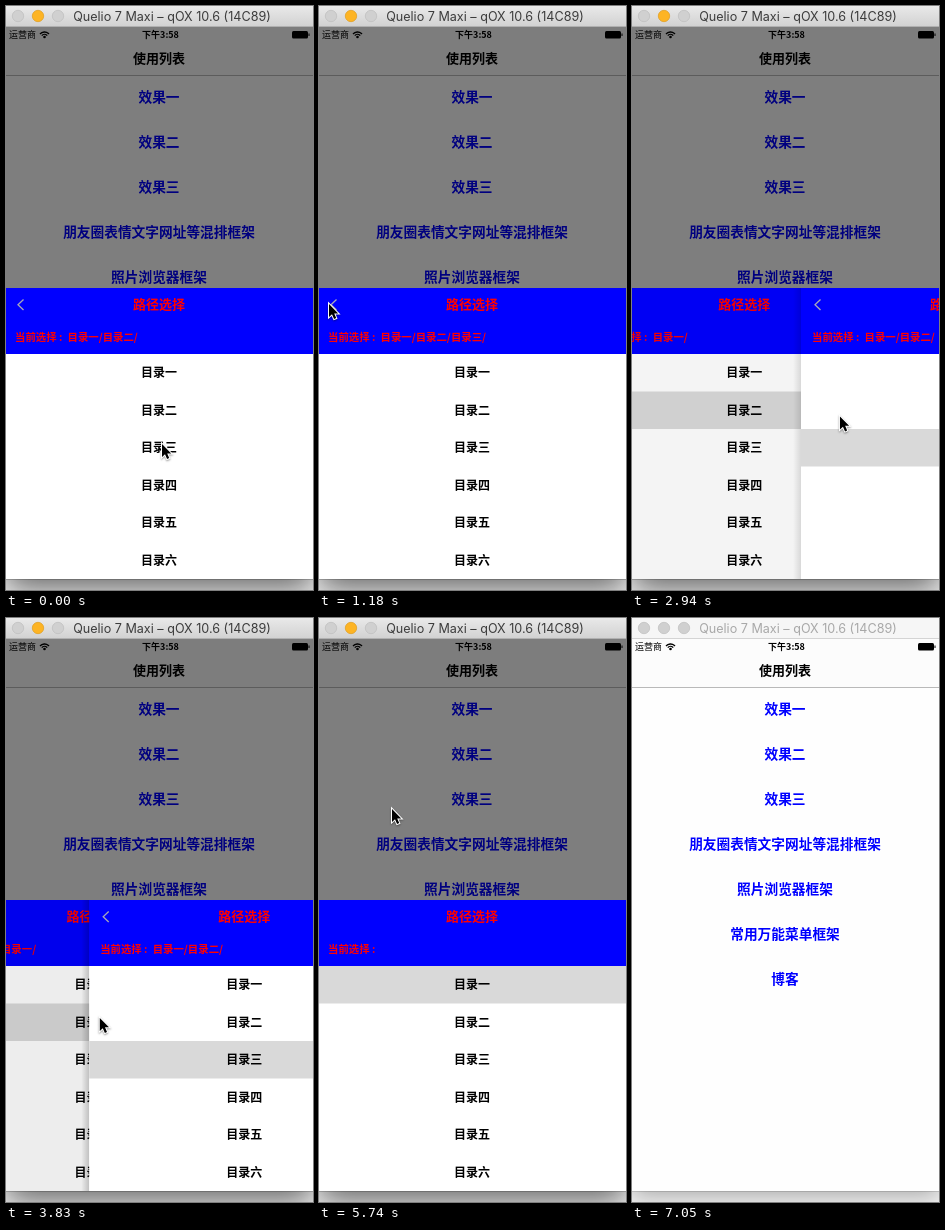
Recreate the animation shown at these times as an HTML page with a canvas. Size 307 by 584 pixels, loop 7.15 s.

```html
<!DOCTYPE html>
<html lang="zh">
<head>
<meta charset="utf-8">
<title>路径选择</title>
<style>
html, body { margin: 0; width: 100%; height: 100%; overflow: hidden; background: #eee; }
canvas { display: block; width: 307px; height: 584px; }
</style>
</head>
<body>
<canvas id="stage"></canvas>
<script>
const W = 307, H = 584, TOP = 21, BOTTOM = 573, SHEET = 282, ROWS = 348, ROW_H = 37.5;
const LOOP = 7150, STEP = 147.18, INACTIVE_AT = 7050, LAST_STEP = 44;
const BLEED = 2;             // pages reach this far past the left window edge
const LAG = 0.4, GRAB = 8;   // a dragged page trails the pointer
const CJK = '"Noto Sans CJK SC", "Noto Sans CJK", sans-serif';
const LATIN = 'Inter, Roboto, sans-serif';

const canvas = document.getElementById('stage');
const ctx = canvas.getContext('2d');
const dpr = window.devicePixelRatio || 1;
canvas.width = W * dpr;
canvas.height = H * dpr;

const MENU = ['效果一', '效果二', '效果三', '朋友圈表情文字网址等混排框架',
  '照片浏览器框架', '常用万能菜单框架', '博客'];
const DIRS = [...'一二三四五六'].map(d => '目录' + d);

// Turning points of the pointer tip: [step, x, y]
const TURNS = [
  [4, 156, 438], [8, 10, 298], [11, 10, 298], [16.5, 1, 412], [21.6, 271, 410],
  [25.8, 92, 400], [29, 251, 392], [31.6, -1, 309], [36, 241, 300], [39, 73, 191]
];

const clamp = v => Math.max(0, Math.min(1, v));
const mix = (a, b, p) => a + (b - a) * p;
const smooth = p => p * p * (3 - 2 * p);
const easeOut = p => 1 - (1 - p) ** 3;

function pointerAt(n) {
  const i = Math.max(1, TURNS.findIndex(k => k[0] >= n));
  const [a, b] = n > TURNS.at(-1)[0] ? TURNS.slice(-2) : [TURNS[i - 1], TURNS[i]];
  const p = smooth(clamp((n - a[0]) / (b[0] - a[0])));
  return [mix(a[1], b[1], p), mix(a[2], b[2], p)];
}

// Follows the pointer, then glides off to the right after the release
function drag(n, release) {
  const x = Math.max(0, pointerAt(n - LAG)[0] - GRAB);
  return mix(x, W, smooth(clamp((n - release) / 2)));
}

// Which page is on top, and how far it has moved to the right
function topPage(n) {
  if (n < 9) return [3, W * (1 - easeOut(clamp((n - 1.4) / 3)))];
  if (n < 17) return [3, W * easeOut(clamp((n - 9.6) / 3))];
  if (n < 32) return [2, drag(n, 27.5)];
  return [1, drag(n, 35)];
}

function rect(color, x, y, w, h) {
  ctx.fillStyle = color;
  ctx.fillRect(x, y, w, h);
}

function gradient(x0, y0, x1, y1, from, to) {
  const g = ctx.createLinearGradient(x0, y0, x1, y1);
  g.addColorStop(0, from);
  g.addColorStop(1, to);
  return g;
}

// y is the visual middle of the glyphs
function label(str, x, y, size, color, align = 'center', weight = 600, family = CJK) {
  ctx.font = `${weight} ${size}px ${family}`;
  ctx.fillStyle = color;
  ctx.textAlign = align;
  ctx.fillText(str, x, y + size * 0.37);
}

function drawBackdrop(active) {
  rect('#f2f2f2', 0, 0, W, H);
  ctx.save();
  ctx.shadowColor = active ? 'rgba(0,0,0,.58)' : 'rgba(0,0,0,.3)';
  ctx.shadowBlur = (active ? 30 : 22) * dpr;
  ctx.shadowOffsetY = (active ? 10 : 5) * dpr;
  rect('#fff', 0, 0, W, BOTTOM);
  ctx.restore();
  rect(active ? 'rgba(0,0,0,.2)' : 'rgba(0,0,0,.14)', 0, BOTTOM, W, 1);
}

function drawStatusBar() {
  label('运营商', 3, 29, 9, '#000', 'left', 400);
  ctx.strokeStyle = '#000';
  ctx.lineWidth = 1.3;
  for (const r of [3.6, 6]) {
    ctx.beginPath();
    ctx.arc(38.5, 32, r, -Math.PI * 0.77, -Math.PI * 0.23);
    ctx.stroke();
  }
  ctx.beginPath();
  ctx.arc(38.5, 31, 1.3, 0, 7);
  ctx.fill();
  label('下午3:58', 154.5, 29, 9, '#000');
  ctx.beginPath();
  ctx.roundRect(286, 25, 16, 7.5, 1.5);
  ctx.fill();
  rect('#000', 302.5, 27.5, 1, 2.5);
}

function drawMenu() {
  rect('#fefefe', 0, TOP, W, BOTTOM - TOP);
  rect('#fcfcfc', 0, TOP, W, 48);
  rect('#b9b9b9', 0, 69, W, 1);
  drawStatusBar();
  label('使用列表', 153, 52, 13, '#000');
  MENU.forEach((name, i) => label(name, 153, 91 + i * 45, 13.7, '#00f'));
}

function drawPage(depth, x, selected) {
  const wide = W + BLEED;
  ctx.save();
  ctx.translate(x, 0);
  rect('#00f', -BLEED, SHEET, wide, ROWS - SHEET);
  rect('#fff', -BLEED, ROWS, wide, BOTTOM - ROWS);
  if (depth > 0) {
    ctx.strokeStyle = '#a8a8b8';
    ctx.lineWidth = 1.3;
    ctx.beginPath();
    ctx.moveTo(17.5, 293.5);
    ctx.lineTo(12, 298.7);
    ctx.lineTo(17.5, 304);
    ctx.stroke();
  }
  label('路径选择', 153, 298.4, 13, '#f00');
  label('当前选择 :', 9, 331.5, 10.4, '#f00', 'left');
  const path = DIRS.slice(0, depth).map(d => d + '/').join('');
  label(path, 61.5, 331.5, 10.4, '#f00', 'left');
  if (selected) rect('#d9d9d9', -BLEED, ROWS + depth * ROW_H, wide, ROW_H);
  DIRS.forEach((d, i) => label(d, 153, 367 + i * ROW_H, 12, '#000'));
  ctx.restore();
}

function drawSheet(n) {
  const [depth, x] = topPage(n);
  if (x > 0) {
    const rest = 1 - x / W, edge = x - BLEED;
    drawPage(depth - 1, -0.3 * W * rest, n > 0);
    rect(`rgba(0,0,0,${0.1 * rest})`, 0, SHEET, W, BOTTOM - SHEET);
    rect(gradient(edge - 8, 0, edge, 0, 'rgba(0,0,0,0)', `rgba(0,0,0,${0.26 * rest})`),
      edge - 8, SHEET, 8, BOTTOM - SHEET);
  }
  if (x < W) drawPage(depth, x, depth < 3);
}

function drawTitleBar(active) {
  rect(active ? gradient(0, 0, 0, 20, '#e9e9e9', '#d2d2d2') : '#f6f6f6', 0, 0, W, 20);
  rect(active ? '#b0b0b0' : '#d4d4d4', 0, 20, W, 1);
  for (let i = 0; i < 3; i++) {
    const lit = active && i === 1;
    ctx.beginPath();
    ctx.arc(12 + i * 20, 10, 5.7, 0, 7);
    ctx.fillStyle = lit ? '#fdb424' : '#d0d0d0';
    ctx.fill();
    ctx.strokeStyle = lit ? '#e09c1c' : '#bdbdbd';
    ctx.lineWidth = 0.7;
    ctx.stroke();
  }
  label('Quelio 7 Maxi – qOX 10.6 (14C89)', 166, 10, 12.6, active ? '#3c3c3c' : '#a8a8a8',
    'center', 400, LATIN);
}

function drawPointer(x, y) {
  const arrow = new Path2D('M0 0V13L3 10.3 5.1 15 7.2 14.1 5.2 9.4H9.2Z');
  ctx.save();
  ctx.translate(x, y);
  ctx.shadowColor = 'rgba(0,0,0,.4)';
  ctx.shadowBlur = 2 * dpr;
  ctx.shadowOffsetY = dpr;
  ctx.strokeStyle = '#fff';
  ctx.lineWidth = 2;
  ctx.stroke(arrow);
  ctx.shadowColor = 'transparent';
  ctx.fillStyle = '#000';
  ctx.fill(arrow);
  ctx.restore();
}

function draw(time) {
  const active = time < INACTIVE_AT;
  const n = Math.min(LAST_STEP, Math.floor((time + 7) / STEP));
  const closed = smooth(clamp((n - 40.4) / 3));

  ctx.setTransform(dpr, 0, 0, dpr, 0, 0);
  drawBackdrop(active);
  ctx.save();
  ctx.beginPath();
  ctx.rect(0, TOP, W, BOTTOM - TOP);
  ctx.clip();
  drawMenu();
  if (closed < 1) {
    rect(`rgba(0,0,0,${0.5 * (1 - closed)})`, 0, TOP, W, BOTTOM - TOP);
    ctx.translate(0, (BOTTOM - SHEET) * closed);
    drawSheet(n);
  }
  ctx.restore();
  drawTitleBar(active);
  if (active) drawPointer(...pointerAt(n));
}

const start = performance.now();
function tick() {
  draw((performance.now() - start) % LOOP);
  requestAnimationFrame(tick);
}
tick();
</script>
</body>
</html>
```
